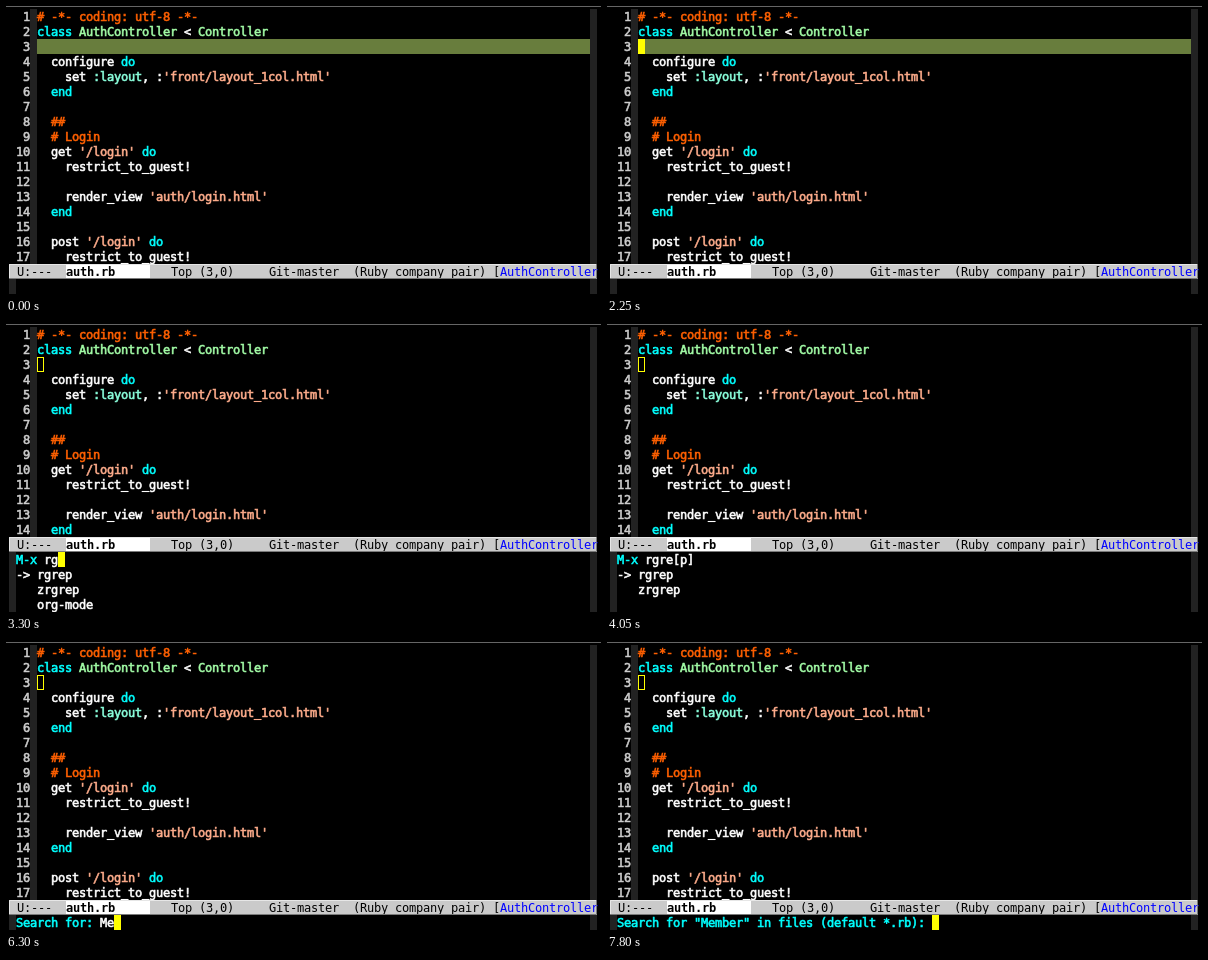
An HTML page for the animation above (8 s loop, 595 by 290 pixels).

```html
<!DOCTYPE html>
<html lang="en">
<head>
<meta charset="utf-8">
<title>Editor session</title>
<style>
  html, body { margin: 0; width: 100%; height: 100%; overflow: hidden; background: #000; }
  svg { display: block; }
  text { font: 12px "DejaVu Sans Mono", monospace; white-space: pre; }
  .glow { stroke-width: .6px; }
  .bold { font-weight: bold; }
</style>
</head>
<body>
<svg id="stage" width="595" height="290" viewBox="0 0 595 290"></svg>
<script>
const NS = "http://www.w3.org/2000/svg";
const stage = document.getElementById("stage");
const CW = 7, LH = 15, LOOP = 8000;
const C = {
  text: "#fff", keyword: "#00ffff", type: "#a2fca6", string: "#ffad8c", symbol: "#8affdc",
  comment: "#ff6000", number: "#ccc", fringe: "#222", line: "#687d3d",
  bar: "#cacaca", light: "#e6e6e6", shade: "#7a7a7a", link: "#0000ff",
  cursor: "#ffff00", rim: "#666"
};

function add(parent, tag, attrs) {
  const el = document.createElementNS(NS, tag);
  for (const k in attrs) el.setAttribute(k, attrs[k]);
  parent.appendChild(el);
  return el;
}
const rect = (parent, x, y, width, height, fill) =>
  add(parent, "rect", { x, y, width, height, fill });

// Text on the character grid; y is the top of the row.
function write(parent, x, y, str, fill, cls = "glow") {
  const el = add(parent, "text", {
    x: Array.from(str, (_, i) => x + i * CW).join(" "), y: y + 12, fill, class: cls
  });
  if (cls === "glow") el.setAttribute("stroke", fill);
  el.textContent = str;
}

const code = `# -*- coding: utf-8 -*-
class AuthController < Controller

  configure do
    set :layout, :'front/layout_1col.html'
  end

  ##
  # Login
  get '/login' do
    restrict_to_guest!

    render_view 'auth/login.html'
  end

  post '/login' do
    restrict_to_guest!`.split("\n");

const token = /(?<comment>#.*)|(?<string>'[^']*')|(?<keyword>\b(?:class|do|end)\b)|(?<type>\b[A-Z]\w+)|(?<symbol>:\w+)|(?<text>[^\s':]+|:)/g;

// Buffer
rect(stage, 0, 0, 595, 290, "#000");
rect(stage, 0, 0, 595, 1, C.rim);
rect(stage, 24, 3, 7, 255, C.fringe);
rect(stage, 584, 3, 7, 255, C.fringe);
const hlLine = rect(stage, 31, 33, 553, LH, C.line);
code.forEach((line, i) => {
  const y = 3 + i * LH;
  write(stage, 10, y, String(i + 1).padStart(2), C.number);
  for (const m of line.matchAll(token)) {
    const kind = Object.keys(m.groups).find(k => m.groups[k]);
    write(stage, 31 + m.index * CW, y, m[0], C[kind]);
  }
});
const point = rect(stage, 31, 33, CW, LH, C.cursor);
const hollow = add(stage, "rect", {
  x: 31.5, y: 33.5, width: 6, height: 14, fill: "none", stroke: C.cursor
});

// Mode line and minibuffer move together
const panel = add(stage, "g", {});
rect(panel, 3, 0, 588, 75, "#000");
rect(panel, 3, LH, 7, 60, C.fringe);
rect(panel, 584, LH, 7, 60, C.fringe);
rect(panel, 3, 0, 588, LH, C.bar);
rect(panel, 60, 0, 84, LH, "#fff");
[[1, "U:---"], [23, "Top (3,0)"], [37, "Git-master"], [49, "(Ruby company pair) ["]]
  .forEach(([col, s]) => write(panel, 4 + col * CW, 0, s, "#000", ""));
write(panel, 60, 0, "auth.rb", "#000", "bold");
write(panel, 494, 0, "AuthController", C.link, "");
add(panel, "path", { d: "M3.5 14V.5H590", fill: "none", stroke: C.light });
add(panel, "path", { d: "M3 14.5H590.5V0", fill: "none", stroke: C.shade });
const mini = add(panel, "g", {});

rect(stage, 0, 288, 595, 2, "#000");

// Each step: start, prompt, input, cursor shown, hint, candidates
const mx = "M-x ", ask = "Search for: ", grep = ["rgrep", "zrgrep"];
const steps = [
  [0, "", "", 0], [150, "", "", 1], [750, "", "", 0],
  [1200, "", "", 1], [1650, "", "", 0], [2250, "", "", 1],
  [2400, mx, "", 1, "", ["cd", "5x5", "arp"]],
  [2850, mx, "", 0, "", ["cd", "5x5", "arp"]],
  [3150, mx, "r", 1, "", ["rcirc", "rgrep", "rmail"]],
  [3300, mx, "rg", 1, "", [...grep, "org-mode"]],
  [3450, mx, "rgr", 1, "[ep]", grep],
  [3600, mx, "rgre", 1, "[p]", grep],
  [4050, mx, "rgre", 0, "[p]", grep],
  [4500, ask, "", 1], [4950, ask, "", 0], [5400, ask, "", 1], [6000, ask, "", 0],
  ...[6150, 6300, 6450, 6750, 6900, 7050].map((t, i) => [t, ask, "Member".slice(0, i + 1), 1]),
  [7650, ask, "Member", 0],
  [7800, 'Search for "Member" in files (default *.rb): ', "", 1]
];

const show = (el, on) => el.setAttribute("visibility", on ? "visible" : "hidden");

function draw([, prompt, input, on, hint = "", list = []]) {
  const editing = !prompt;
  show(hlLine, editing);
  show(point, editing && on);
  show(hollow, !editing);
  panel.setAttribute("transform", `translate(0 ${list.length ? 213 : 258})`);
  mini.replaceChildren();
  if (editing) return;

  const inputX = 10 + prompt.length * CW, end = inputX + input.length * CW;
  write(mini, 10, LH, prompt, C.keyword);
  write(mini, inputX, LH, input, C.text);
  write(mini, end, LH, hint, C.text);
  if (on) {
    rect(mini, end, LH, CW, LH, C.cursor);
    write(mini, end, LH, hint.slice(0, 1), "#000", "");
  }
  if (list.length) write(mini, 10, 2 * LH, "->", C.text);
  list.forEach((s, i) => write(mini, 31, (i + 2) * LH, s, C.text));
}

const start = performance.now();
let current;
function tick(now) {
  const t = Math.max(0, now - start) % LOOP;
  const step = steps.findLast(s => s[0] <= t);
  if (step !== current) draw(current = step);
  requestAnimationFrame(tick);
}
tick(start);
</script>
</body>
</html>
```
